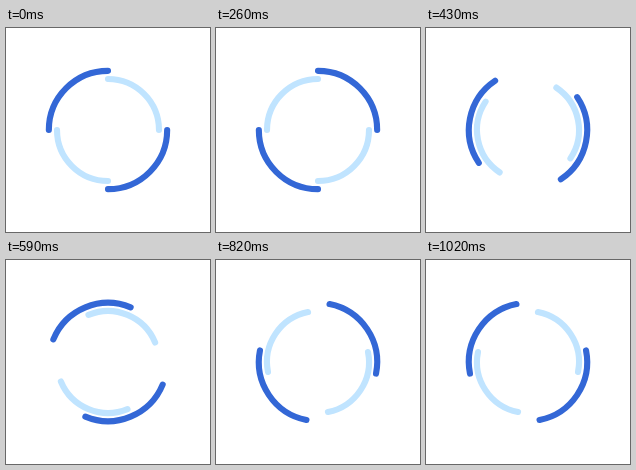
Animation, 204 px wide and 204 px high, one loop 1050 ms. Source, as an HTML page:

```html
<!DOCTYPE html>
<html lang="en">
<head>
<meta charset="utf-8">
<title>Double ring spinner</title>
<style>
  html, body { margin: 0; width: 100%; height: 100%; overflow: hidden; background: #fff; }
  svg { display: block; width: 100vw; height: 100vh; }
  path { fill: none; stroke-width: 3; stroke-linecap: round; }
  #outer { stroke: #3367d6; }
  #inner { stroke: #c0e4ff; }
</style>
</head>
<body>
<svg viewBox="-50 -50 100 100">
  <path id="outer" d="M29 0A29 29 0 0 1 0 29M-29 0A29 29 0 0 1 0 -29"/>
  <path id="inner" d="M0 25A25 25 0 0 1 -25 0M0 -25A25 25 0 0 1 25 0"/>
</svg>
<script>
  const LOOP = 1050, STEPS = 32, STEP_MS = 33;
  const outer = document.getElementById('outer');
  const inner = document.getElementById('inner');
  const start = performance.now();

  // Steps last 33 ms on average, aligned to a 10 ms clock.
  function draw() {
    const t = (performance.now() - start) % LOOP;
    const step = Math.floor((Math.floor(t / 10) * 10 + 6) / STEP_MS);
    const angle = step * 360 / STEPS;
    outer.setAttribute('transform', `rotate(${angle})`);
    inner.setAttribute('transform', `rotate(${-angle})`);
    requestAnimationFrame(draw);
  }
  draw();
</script>
</body>
</html>
```
